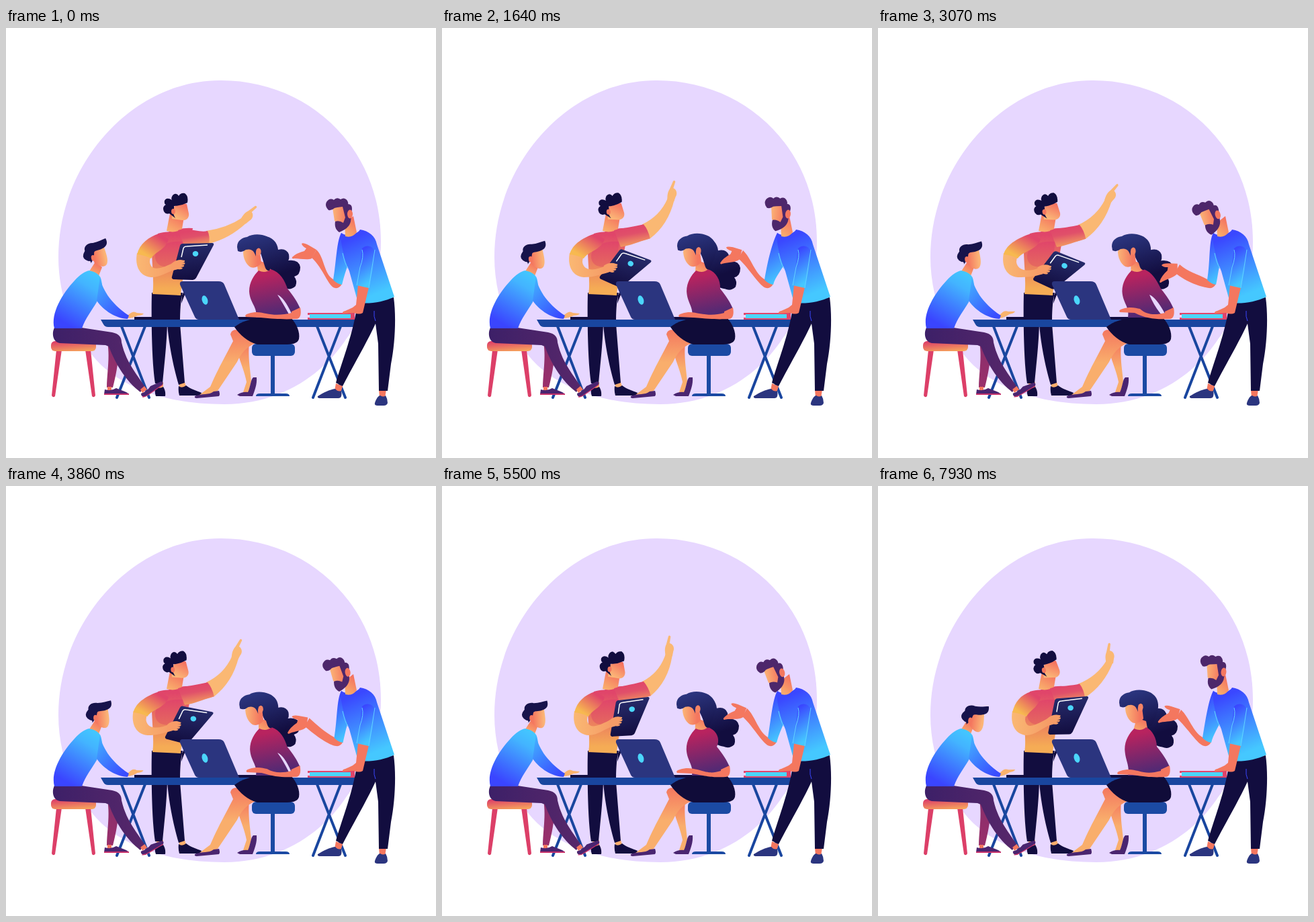
Write an HTML page that moves like this. It is 640 by 640 pixels and loops after 8 s.

```html
<!DOCTYPE html>
<html lang="en">
<head>
<meta charset="utf-8">
<title>Team at a table</title>
<style>
html, body { margin: 0; width: 100%; height: 100%; overflow: hidden; background: #fff; }
svg { display: block; width: 100%; height: 100%; }
</style>
</head>
<body>
<svg viewBox="0 0 640 640">
<defs>
  <linearGradient id="blue" x1=".8" y1="0" x2=".3" y2="1"><stop stop-color="#43c8ff"/><stop offset=".25" stop-color="#43b4ff"/><stop offset=".95" stop-color="#3a45ff"/></linearGradient>
  <linearGradient id="blueArm" x1="0" y1="0" x2=".7" y2="1"><stop stop-color="#43b8ff"/><stop offset="1" stop-color="#3a4dff"/></linearGradient>
  <linearGradient id="sky" x1=".3" y1="0" x2=".6" y2="1"><stop offset=".08" stop-color="#3a47ff"/><stop offset=".9" stop-color="#45c8ff"/></linearGradient>
  <linearGradient id="face"><stop offset=".1" stop-color="#f4775f"/><stop offset=".9" stop-color="#fbb577"/></linearGradient>
  <linearGradient id="faceR" x1="1" x2="0"><stop offset=".2" stop-color="#f4775f"/><stop offset="1" stop-color="#fbb577"/></linearGradient>
  <linearGradient id="faceD" x1=".9" y1="0" x2=".3" y2="1"><stop offset=".1" stop-color="#f4705f"/><stop offset=".9" stop-color="#fbb577"/></linearGradient>
  <linearGradient id="neck" x1=".8" y1="0" x2=".3" y2="1"><stop offset=".1" stop-color="#f4705f"/><stop offset="1" stop-color="#f9ae6c"/></linearGradient>
  <linearGradient id="leg" x1="0" y1="0" x2="0" y2="1"><stop stop-color="#f4775f"/><stop offset=".5" stop-color="#f9ae6c"/></linearGradient>
  <linearGradient id="warm" x1="0" y1="0" x2="0" y2="1"><stop offset=".1" stop-color="#e0456a"/><stop offset=".9" stop-color="#f5ac55"/></linearGradient>
  <linearGradient id="fold" x1="0" y1="0" x2="0" y2="1"><stop stop-color="#e0456a"/><stop offset="1" stop-color="#e5695f"/></linearGradient>
  <linearGradient id="sleeve" x1=".75" y1=".15" x2=".15" y2=".85"><stop stop-color="#e0456a"/><stop offset=".9" stop-color="#f7b950"/></linearGradient>
  <linearGradient id="sleeveR" x1=".4" y1=".1" x2=".65" y2="1"><stop stop-color="#e0456a"/><stop offset=".35" stop-color="#e0506a"/><stop offset="1" stop-color="#f5a85c"/></linearGradient>
  <linearGradient id="forearm"><stop stop-color="#fab873"/><stop offset="1" stop-color="#f59a66"/></linearGradient>
  <linearGradient id="seat" x1=".3" y1="0" x2=".7" y2="1"><stop stop-color="#dd4068"/><stop offset="1" stop-color="#f6a35c"/></linearGradient>
  <linearGradient id="plum" x1=".4" y1="0" x2=".6" y2="1"><stop offset=".1" stop-color="#b8235f"/><stop offset="1" stop-color="#472a76"/></linearGradient>
  <linearGradient id="hair" gradientUnits="userSpaceOnUse" x1="370" y1="308" x2="390" y2="372"><stop stop-color="#2b357f"/><stop offset="1" stop-color="#120d3f"/></linearGradient>
  <linearGradient id="pad" x1=".4" y1="0" x2=".5" y2="1"><stop stop-color="#272c6c"/><stop offset="1" stop-color="#120d3f"/></linearGradient>
  <linearGradient id="shin" x1="0" y1="0" x2="0" y2="1"><stop offset=".2" stop-color="#8c2e6b"/><stop offset="1" stop-color="#9a306b"/></linearGradient>
  <linearGradient id="trouser"><stop stop-color="#3d2068"/><stop offset="1" stop-color="#57276a"/></linearGradient>
</defs>

<path fill="#e7d7ff" d="M318 78C450 77 558 178 558 318C558 372 540 420 507 462C472 516 408 560 325 560C250 560 186 542 142 502C100 460 78 400 78 341C78 200 190 78 318 78Z"/>

<!-- standing man -->
<g>
  <path fill="#f9ae6c" d="M224 527H234V538H224ZM257 529L266 527 269 536 259 538Z"/>
  <path fill="#120d3f" d="M217 394H263C260 405 259 420 259 440L266 528 257 531C250 508 242 470 240 440C239 475 235 505 233 529H222C217 500 216 430 217 394ZM262 398L266 390 268 392 261 410ZM222 537C225 533 228 538 234 534Q238 540 237 548H223Q221 542 222 537ZM257 533Q262 537 268 532C274 537 284 540 291 543L290 547H258Q256 540 257 533Z"/>
  <path fill="url(#warm)" d="M226 306C236 303 246 304 256 300Q266 297 278 298L272 328C268 350 262 375 260 398L218 396C221 380 217 350 217 330Z"/>
  <path fill="url(#fold)" d="M222 340C222 325 240 316 264 318L260 346C248 360 222 359 222 340Z"/>
  <path fill="url(#neck)" d="M244 276L265 281 262 299Q252 306 239 302Z"/>
  <g id="pHead">
    <path fill="url(#faceD)" d="M248 267C256 262 264 260 269 262L272 276C273 282 269 287 262 286L247 284Z"/>
    <path fill="#120d3f" d="M250 265Q260 265 270 260Q272 250 266 246Q260 245 257 250Q253 244 248 249Q245 254 247 256Q239 251 236 257Q235 262 238 263Q232 266 235 273Q238 278 243 276L252 283Q247 274 250 272Z"/>
    <ellipse cx="249" cy="273" rx="3" ry="4" fill="#f4775f"/>
  </g>
  <path id="pFore" fill="#fab873"/>
  <path id="pSleeve" fill="url(#sleeveR)"/>
  <path id="pHand" fill="#fab873" d="M-5 3C-7 -4 -7 -9 -5 -14L-2.5 -26Q-1 -29 1 -26L0 -16C5 -15 8 -10 6 -4L5 3Z"/>
  <g id="pad">
    <path fill="url(#pad)" d="M5 -31L49 -32Q52 -32 51 -29L25 20Q23 23 20 23L-9 22Q-12 21 -11 18L1 -28Q2 -31 5 -31Z"/>
    <path fill="none" stroke="#fff" stroke-width="1.5" stroke-linejoin="round" d="M3 -11L6 -24Q7 -27 11 -27L42 -29"/>
    <ellipse cx="24" cy="-16" rx="4.3" ry="4" fill="#4bd6fb"/>
  </g>
  <path id="lFore" fill="url(#forearm)"/>
  <path id="lSleeve" fill="url(#sleeve)"/>
  <path id="grip" fill="#f79c67" d="M-12 -1Q-6 -7 2 -7L8 -6Q9 -3 3 -2L8 -3Q10 0 3 1L7 1Q8 4 2 4L5 5Q4 8 -2 7L-11 9Z"/>
</g>

<!-- table -->
<path fill="none" stroke="#19469f" stroke-width="4" stroke-linecap="round" d="M207 444L165 550M172 444L213 550M463 444L505 550M498 444L457 550"/>
<path fill="#19469f" d="M141 434H523V445H152Q147 445 145 441Z"/>
<path fill="#120d3f" d="M191 430H247V434H191ZM320 430H386V434H320Z"/>

<!-- man on the stool -->
<path fill="#dc3f68" d="M75 479H83L73 548Q70 551 68 547ZM118 479H126L133 547Q131 551 128 548Z"/>
<rect x="67" y="466" width="67" height="15" rx="6" fill="url(#seat)"/>
<path fill="url(#shin)" d="M151 468H169C168 495 164 515 159 535H150C150 515 155 490 151 468Z"/>
<path fill="#f4775f" d="M151 534H157V540H151Z"/>
<path fill="#4a2570" d="M147 538Q156 541 164 536C172 540 180 541 183 545H146Z"/>
<path fill="#c5316a" d="M146 544H183V546H146Z"/>
<path fill="url(#trouser)" d="M72 446H112L158 453C168 455 172 460 172 468C178 495 192 512 206 533L200 542C183 529 166 508 153 474L148 472 80 469C69 467 68 454 72 446Z"/>
<g id="foot">
  <path fill="#f4775f" d="M200 538L206 533 210 538 203 543Z"/>
  <path fill="#4a2570" d="M201 544Q210 541 215 533L231 526Q235 527 233 531L208 548Q201 550 201 544Z"/>
  <path fill="none" stroke="#c5316a" stroke-width="1.3" d="M203 549Q208 549 213 545L233 531"/>
</g>
<path fill="url(#neck)" d="M133 348L143 356 138 369Q130 368 124 362Z"/>
<path id="lHand" fill="#f9b36d" d="M179 429L186 424Q190 421 195 424L205 425Q203 428 196 428Q188 432 181 432Z"/>
<path fill="url(#blue)" d="M124 361C134 363 141 368 142 376C145 388 140 396 135 408C128 420 118 432 113 447H72C66 425 84 395 102 376C110 367 118 362 124 361Z"/>
<path fill="url(#blueArm)" d="M140 370C142 386 154 409 183 428L181 433C163 432 146 421 135 406Z"/>
<g id="lHead">
  <path fill="url(#face)" d="M134 337L153 333C154 343 156 353 152 359C148 364 141 361 134 353Z"/>
  <path fill="#17134b" d="M129 353Q130 349 126 349Q117 344 121 337L124 333C123 326 131 322 138 324C146 324 152 322 158 321C160 328 158 333 150 335C144 337 139 335 137 338L135 346Z"/>
  <ellipse cx="134" cy="346" rx="3" ry="4.5" fill="#f4775f"/>
</g>

<!-- laptop -->
<path fill="#2b357f" d="M263 377H316Q323 377 325 382L347 434H287Q283 434 281 430L259 382Q258 377 263 377Z"/>
<ellipse cx="296" cy="405" rx="4.2" ry="7" transform="rotate(-17 296 405)" fill="#4bd6fb"/>

<!-- woman -->
<path fill="#1b4aa3" d="M394 486H400V545H394ZM372 548Q372 544 378 544H416Q422 544 422 548Z"/>
<rect x="366" y="470" width="64" height="18" rx="6" fill="#1b4aa3"/>
<path fill="url(#leg)" d="M343 475L362 468C360 490 363 505 365 526L361 542 352 545 358 527C355 510 347 495 343 475Z"/>
<path fill="url(#leg)" d="M334 456C337 444 352 448 372 469C358 474 350 484 344 497L315 540 301 545 288 546 304 534C315 508 330 482 338 466Z"/>
<path fill="#4a2570" d="M281 548C292 543 302 547 309 541L317 540Q319 545 317 548L284 551Q280 551 281 548ZM344 546Q352 541 360 542C364 534 364 523 368 520L373 520C374 530 370 540 367 548H348Z"/>
<path fill="#100c39" d="M340 445C350 437 365 432 382 431H424C432 440 438 452 436 463C434 470 425 471 415 471H374C360 467 348 457 340 445Z"/>
<path id="wHair" fill="url(#hair)" d="M375 312C392 306 404 317 405 330Q417 327 421 337Q422 344 420 346Q436 344 438 356Q438 368 429 370Q434 376 431 384Q424 391 415 387C400 385 389 373 389 355L379 335Z"/>
<path id="wNeck" fill="url(#neck)"/>
<path id="wBody" fill="url(#plum)"/>
<path id="wGap" fill="#e7d7ff"/>
<path id="wArm" fill="#f4775f"/>
<g id="wHead">
  <path fill="url(#faceR)" d="M355 328L377 326 380 350Q372 359 364 356C357 352 353 342 353 334Z"/>
  <path fill="url(#hair)" d="M344 326C344 316 352 312 359 311C370 304 392 307 399 319C406 331 400 347 392 361Q387 362 385 354L379 335 373 329Q371 334 372 340C369 331 365 328 357 330Q351 335 345 332Z"/>
  <ellipse cx="376" cy="333" rx="3.6" ry="5.5" fill="#f58465"/>
</g>

<!-- books -->
<path fill="#e0456a" d="M449 424H519V434H449V431H511V427H449Z"/>
<path fill="#4bd6fb" d="M452 426H513V432H452Z"/>

<!-- bearded man -->
<path fill="#f4775f" d="M491 529L501 533 498 543 489 540ZM555 538H566L564 551H556Z"/>
<path fill="#2b357f" d="M464 548C472 543 482 538 490 537Q494 542 499 540Q501 551 495 551H468Q463 551 464 548ZM549 558C551 552 554 547 557 547Q562 550 565 547Q568 552 568 558Q567 562 562 562H553Q548 562 549 558Z"/>
<path fill="#120d3f" d="M523 408L577 401C581 430 579 470 573 500L568 540H555L554 470 550 440C536 470 517 502 501 533L491 528C500 495 519 450 523 408Z"/>
<path fill="none" stroke="#3a47ff" d="M548 421Q547 430 550 436"/>
<path id="rFore" fill="#f4775f"/>
<path id="rHand" fill="#f4775f" d="M4 -6L-8 -13Q-16 -17 -18 -15Q-17 -11 -11 -8L-14 -4Q-26 -1 -32 5Q-33 8 -29 7C-20 7 -10 10 -3 7Z"/>
<path id="rSleeve" fill="url(#sky)"/>
<path fill="url(#sky)" d="M499 305C509 312 524 306 527 300C540 302 550 310 552 322L578 400C562 408 542 411 524 409L511 362C504 345 497 322 499 305Z"/>
<path fill="#f4775f" d="M524 382L540 386 531 424Q526 427 518 424L501 425Q500 422 505 421L516 416 521 412Z"/>
<path fill="url(#sky)" d="M530 328C538 320 551 326 550 340L540 387 522 383Z"/>
<path fill="none" stroke="#62d2ff" d="M530 330Q533 340 527 356L522 383M549 330L540 387M501 335Q504 350 509 358"/>
<path fill="url(#neck)" d="M504 290L517 280 522 304Q515 313 505 310Z"/>
<g id="rHead">
  <path fill="url(#faceR)" d="M486 268L504 263 512 272 510 292 499 296 489 287Z"/>
  <path fill="#4d276b" d="M480 271Q474 265 477 259Q482 252 488 256Q492 251 498 255Q504 251 508 257Q510 261 509 262Q515 262 515 269L513 288C511 297 503 301 496 304C490 300 489 294 490 288Q496 286 502 290L505 282 501 266Q492 267 489 268Q485 272 480 271Z"/>
  <ellipse cx="512" cy="277" rx="4" ry="6.5" fill="#f4775f"/>
</g>
</svg>

<script>
const LOOP = 8000;
const KEYS = [0, 1640, 3070, 4640, 5500, 6570, 7930];

// One value per key time.
const tracks = {
  lHead: [-12, -6, -5, 0, -2, 8, 9],
  foot: [0, 0, 4, 5, 3, 0, 4],
  lift: [0, 0, 8, 0, 0, 0, 7],
  pHead: [0, -5, -6, 0, 2, 0, -9],
  wristX: [355, 341, 343, 340, 338, 336, 345],
  wristY: [286, 254, 256, 252, 250, 248, 261],
  point: [42, 12, 32, 8, 3, -3, 0],
  elbow: [194, 189, 186, 191, 196, 199, 199],
  pad: [0, 22, 23, 2, -5, -9, -3],
  wHead: [0, 6, 4, 2.5, 5, 13, 15],
  wHair: [0, 6, 1, -2, 4, 9, 8],
  wElbow: [438, 433, 440, 435, 428, 428, 434],
  typeX: [355, 351, 358, 355, 348, 348, 355],
  typeY: [428, 428, 421, 427, 425, 421, 427],
  rHead: [0, 6, -13, -1, -12, -1, 5],
  cuff: [487, 480, 490, 487, 485, 487, 483],
  palmX: [458, 444, 445, 450, 450, 446, 447],
  palmY: [336, 337, 358, 345, 337, 350, 339],
  palm: [0, -14, -28, -12, -7, -18, -12]
};

const el = {};
document.querySelectorAll('svg > [id], svg > g [id]').forEach(n => { el[n.id] = n; });
const shape = (id, d) => el[id].setAttribute('d', d);
const move = (id, t) => el[id].setAttribute('transform', t);

function poseAt(t) {
  let i = 0;
  while (i < KEYS.length - 2 && t > KEYS[i + 1]) i++;
  const u = Math.min(1, (t - KEYS[i]) / (KEYS[i + 1] - KEYS[i]));
  const e = (1 - Math.cos(Math.PI * u)) / 2;
  const pose = {};
  for (const k in tracks) pose[k] = tracks[k][i] + (tracks[k][i + 1] - tracks[k][i]) * e;
  return pose;
}

function drawPointing(p) {
  const { wristX: x, wristY: y } = p;
  const q = (286 - y) / 33;
  const a = (55 - 40 * q) * Math.PI / 180;
  const px = 5 * Math.cos(a), py = 5 * Math.sin(a);
  const top = 302 - 10 * q, bx = 302 + 8 * q, by = 321 - 8 * q;
  shape('pFore', `M298 ${top}Q${330 - 5 * q} ${297 - 18 * q} ${x - px} ${y - py}L${x + px} ${y + py}Q${332 + 5 * q} ${314 - 22 * q} ${bx} ${by}L296 ${by + 4}Z`);
  shape('pSleeve', `M256 301C274 297 288 ${top + 3} 300 ${top}Q${304 + 3 * q} ${top + 8} ${bx} ${by}C292 ${by + 5} 280 324 266 326Z`);
  move('pHand', `translate(${x} ${y}) rotate(${p.point})`);
}

function drawPadArm(p) {
  const e = p.elbow, x = 258 + (e - 194) * 1.1, y = 352 - (e - 194) * 0.9;
  move('pad', `translate(${x} ${y}) rotate(${p.pad})`);
  move('grip', `translate(${x} ${y}) rotate(${p.pad * 0.4})`);
  shape('lFore', `M${e + 1} 335C${e - 2} 350 ${e + 2} 369 ${e + 22} 371C${e + 36} 371 ${x - 18} ${y + 11} ${x - 4} ${y + 7}L${x - 8} ${y - 3}C${x - 22} ${y + 4} ${e + 27} 362 ${e + 22} 354Q${e + 18} 348 ${e + 22} 340Z`);
  shape('lSleeve', `M228 306C212 311 ${e + 5} 321 ${e + 1} 337Q${e + 12} 338 ${e + 22} 343C${e + 29} 332 238 330 242 314Z`);
}

function drawWoman(p) {
  const e = p.wElbow, h = p.wHead, x = p.typeX, y = p.typeY;
  const s = h * 0.35, gap = Math.max(0, e - 434) * 0.7;
  move('wHead', `translate(${h} ${-h * 0.25})`);
  move('wHair', `translate(${p.wHair} ${p.wHair * 0.2})`);
  shape('wNeck', `M${373 + h * 0.8} 345L${387 + h * 0.8} 350 ${396 + s} 362Q${386 + s} 372 ${375 + s} 363Z`);
  shape('wBody', `M${376 + s} 361Q${386 + s} 366 ${394 + s} 359C408 363 415 376 ${e - 19} 388C${e - 10} 399 ${e - 4} 408 ${e} 418L${e - 13} 425V431H372C375 415 ${363 + s} 410 ${362 + s} 392C${362 + s} 378 ${369 + s} 368 ${376 + s} 361Z`);
  shape('wGap', `M404 397Q414 401 ${e - 13} 425H${e - 13 - gap * 1.6}Q${414 - gap} ${401 + gap * 2.5} 404 397Z`);
  shape('wArm', `M${e - 13} 422L${e} 416C${e + 2} 426 ${e} 433 ${e - 6} 433C${e - 25} 434 400 433 ${x + 24} ${y + 3}L${x + 2} ${y + 2}Q${x - 1} ${y - 1} ${x + 6} ${y - 3}C${x + 18} ${y - 7} ${x + 26} ${y - 4} ${x + 32} ${y - 3}C400 428 ${e - 25} 427 ${e - 13} 424Z`);
}

function drawGesture(p) {
  const { cuff: c, palmX: x, palmY: y } = p;
  shape('rSleeve', `M499 305C492 318 ${c + 5} 345 ${c} 375Q${c + 6} 381 ${c + 13} 382C${c + 16} 370 506 360 510 350L520 320Z`);
  shape('rFore', `M${c + 13} 381Q${c + 9} 388 ${c + 3} 387C${c - 7} 386 ${x + 14} ${y + 21} ${x - 3} ${y + 6}L${x + 4} ${y - 6}C${x + 16} ${y + 5} ${c - 14} 366 ${c} 374Z`);
  move('rHand', `translate(${x} ${y}) rotate(${p.palm})`);
}

function draw(t) {
  const p = poseAt(t);
  move('lHead', `translate(${p.lHead * 0.25} ${p.lHead * 0.4}) rotate(${p.lHead} 139 352)`);
  move('foot', `rotate(${p.foot} 205 541)`);
  move('lHand', `rotate(${-p.lift} 181 430)`);
  move('pHead', `rotate(${p.pHead} 256 287)`);
  move('rHead', `rotate(${p.rHead} 513 305)`);
  drawPointing(p);
  drawPadArm(p);
  drawWoman(p);
  drawGesture(p);
}

const start = performance.now();
function tick() {
  draw((performance.now() - start) % LOOP);
  requestAnimationFrame(tick);
}
tick();
</script>
</body>
</html>
```
